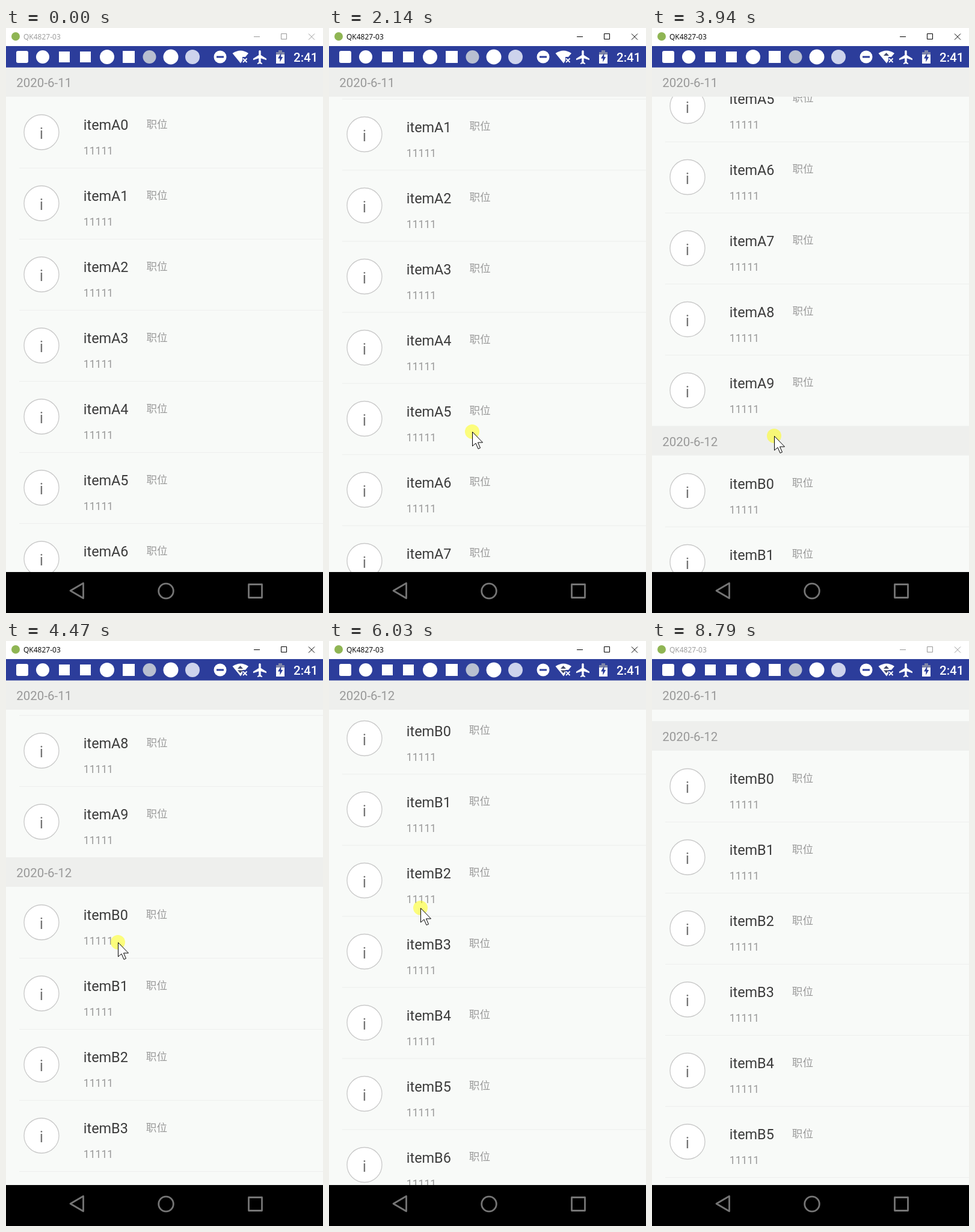
Write an HTML page that moves like this. It is 527 by 971 pixels and loops after 8870 ms.

```html
<!DOCTYPE html>
<html lang="zh-CN">
<head>
<meta charset="utf-8">
<title>Sticky list</title>
<style>
  html, body { margin: 0; width: 100%; height: 100%; overflow: hidden; background: #fff; }
  svg { display: block; width: 527px; height: 971px; }
  text { font-family: Roboto, "Noto Sans CJK SC", "Noto Sans CJK", sans-serif; }
  .date { font-size: 20.5px; fill: #999; }
  .name { font-size: 23.42px; fill: #3c3c3c; }
  .small { font-size: 17.57px; fill: #999; }
  .initial { font-size: 26px; fill: #757575; text-anchor: middle; }
  .avatar { fill: #fff; stroke: #c9c9c9; stroke-width: 1.3; }
  .rule { fill: #eeefee; }
  .strip { fill: #eeefed; }
  .clock { font-size: 20.5px; font-weight: 500; fill: #fff; }
  .nav { fill: none; stroke: #757575; stroke-width: 2.8; stroke-linejoin: round; }
  #frame { color: #999; }
  #frame.active { color: #000; }
  #frame text { font: 12px "Open Sans", "Noto Sans", sans-serif; fill: currentColor; }
  #frame path { fill: none; stroke: currentColor; }
</style>
</head>
<body>
<svg viewBox="0 0 527 971">
  <defs><clipPath id="view"><rect y="65" width="527" height="838"/></clipPath></defs>
  <rect width="527" height="971" fill="#f8faf8"/>

  <g clip-path="url(#view)">
    <g id="list"></g>
    <g id="sticky">
      <rect class="strip" y="65" width="527" height="49"/>
      <text class="date" id="stickyDate" x="17.3" y="98.2"></text>
    </g>
  </g>

  <rect width="527" height="30" fill="#fff"/>
  <g id="frame">
    <circle cx="16" cy="14" r="7" fill="#8fb554"/>
    <text x="29" y="18.5">QK4827-03</text>
    <path d="M412 14.5H422M457.5 9.5h9v9h-9zM503 9.5l10 10m0-10l-10 10"/>
  </g>

  <rect y="30" width="527" height="35.5" fill="#2c3d9b"/>
  <g fill="#fff">
    <rect x="17" y="38" width="20" height="20" rx="3"/>
    <circle cx="61" cy="48" r="11"/>
    <rect x="88" y="39" width="18" height="18"/>
    <rect x="123" y="39" width="18" height="18"/>
    <circle cx="168" cy="48" r="12"/>
    <rect x="194" y="38" width="20" height="20"/>
    <circle cx="238.500" cy="48" r="11" fill="#b8bfd0"/>
    <circle cx="274" cy="48" r="12.500"/>
    <circle cx="310" cy="48" r="12" fill="#cdd3ec"/>
    <circle cx="356" cy="48" r="10.500"/>
    <rect x="350" y="46.500" width="12" height="3" fill="#2c3d9b"/>
    <path d="M376.500 42Q390 33 403 42L398 48H393V54L390 58.500Z"/>
    <path d="M394 50.500l6.500 6.500m0-6.500l-6.500 6.500" stroke="#fff" stroke-width="1.800"/>
    <g fill="#43496a">
      <path id="up" d="M385 46l4.500-5 4.500 5z"/>
      <path id="down" d="M385 48.500h9l-4.500 5z"/>
    </g>
    <path transform="translate(408.600 34.600) scale(1.16)" d="M21 16v-2l-8-5V3.500c0-.83-.67-1.500-1.500-1.500S10 2.670 10 3.500V9l-8 5v2l8-2.500V19l-2 1.500V22l3.500-1 3.500 1v-1.500L13 19v-5.500l8 2.500z"/>
    <path d="M449 40h4v-3h6v3h4v5h-14z" fill="#7f86a8"/>
    <path d="M449 44h14v15h-14z"/>
    <path d="M457.500 41.500l-5.500 9h3.300v6l5-8.500h-3z" fill="#2c3d9b"/>
  </g>
  <text class="clock" x="478" y="55.500">2:41</text>

  <rect y="903" width="527" height="68"/>
  <path class="nav" d="M107 934L128.500 921.500V946.500Z"/>
  <circle class="nav" cx="266" cy="934.500" r="12.300"/>
  <rect class="nav" x="403.500" y="923.500" width="22" height="22"/>

  <g id="cursor">
    <circle r="12" fill="#ff0" opacity=".5"/>
    <path d="M.5 .5V24L6 19.200 10 28.500 13.500 27 9.500 18H17.500Z" fill="#fff" stroke="#000"/>
  </g>
</svg>
<script>
const $ = id => document.getElementById(id);
const LOOP = 8870, TICK = 77.97, START = 1420;
const TOP = 65, STRIP = 49, ROW = 118, COUNT = 10;
const SECOND = TOP + STRIP + COUNT * ROW;

const strip = (y, date) =>
  `<rect class="strip" y="${y}" width="527" height="${STRIP}"/>
   <text class="date" x="17.3" y="${y + 33.2}">${date}</text>`;

const row = (y, name, last) =>
  `<g transform="translate(0 ${y})">
     <circle class="avatar" cx="59" cy="59" r="29"/>
     <text class="initial" x="59" y="70">i</text>
     <text class="name" x="128.800" y="55">${name}<tspan class="small" dx="30" dy="-3.200">职位</tspan></text>
     <text class="small" x="128.800" y="96">11111</text>
     ${last ? '' : '<rect class="rule" x="22" y="118" width="505" height="1"/>'}
   </g>`;

const section = (y, date, letter) => {
  let html = strip(y, date);
  for (let i = 0; i < COUNT; i++)
    html += row(y + STRIP + i * ROW, `item${letter}${i}`, i === COUNT - 1);
  return html;
};

$('list').innerHTML = section(TOP, '2020-6-11', 'A') + section(SECOND, '2020-6-12', 'B');

// tick, scroll offset, pointer x, pointer y
const keys = [
  [-18, 0, 204, 960], [-13, 0, 268, 803], [-11, 0, 270, 801], [-7, 0, 263, 847],
  [0, 0, 262, 848], [3, 0, 256, 797], [9, 114.5, 238, 670], [15, 350, 222, 440],
  [17, 400, 215, 410], [24, 505, 208, 795], [26, 521, 207, 790], [32, 633.5, 203, 677],
  [37, 905, 190, 405], [43, 995, 178, 690], [47, 1096, 167, 584], [54, 1205, 157, 475],
  [59, 1240.5, 152, 443], [64, 1248, 146, 436], [66, 1248, 143, 437], [70, 1203.5, 134, 499],
  [75, 1172, 128, 531], [77, 1172, 127, 531], [80, 1161, 126, 542]
];

function pose(tick) {
  const next = keys.findIndex(k => k[0] > tick);
  if (next === 0) return keys[0];
  if (next < 0) return keys[keys.length - 1];
  const a = keys[next - 1], b = keys[next];
  const p = (tick - a[0]) / (b[0] - a[0]);
  return a.map((v, i) => v + (b[i] - v) * p);
}

const show = (id, on) => $(id).setAttribute('visibility', on ? 'visible' : 'hidden');
const move = (id, x, y) => $(id).setAttribute('transform', `translate(${x} ${y})`);

function draw(now) {
  const t = now % LOOP;
  const tick = Math.floor((t - START) / TICK);
  const [, scroll, x, y] = pose(tick);
  const edge = SECOND - scroll;
  const passed = edge <= TOP;

  move('list', 0, -scroll);
  move('sticky', 0, passed ? 0 : Math.min(0, edge - TOP - STRIP));
  $('stickyDate').textContent = passed ? '2020-6-12' : '2020-6-11';
  move('cursor', Math.round(x), Math.round(y));
  show('cursor', tick >= -18 && tick < 80);
  show('up', t >= 3300);
  show('down', t >= 4250);
  $('frame').classList.toggle('active', t >= 1430 && t < 8790);
  requestAnimationFrame(() => draw(performance.now() - origin));
}

const origin = performance.now();
draw(0);
</script>
</body>
</html>
```
